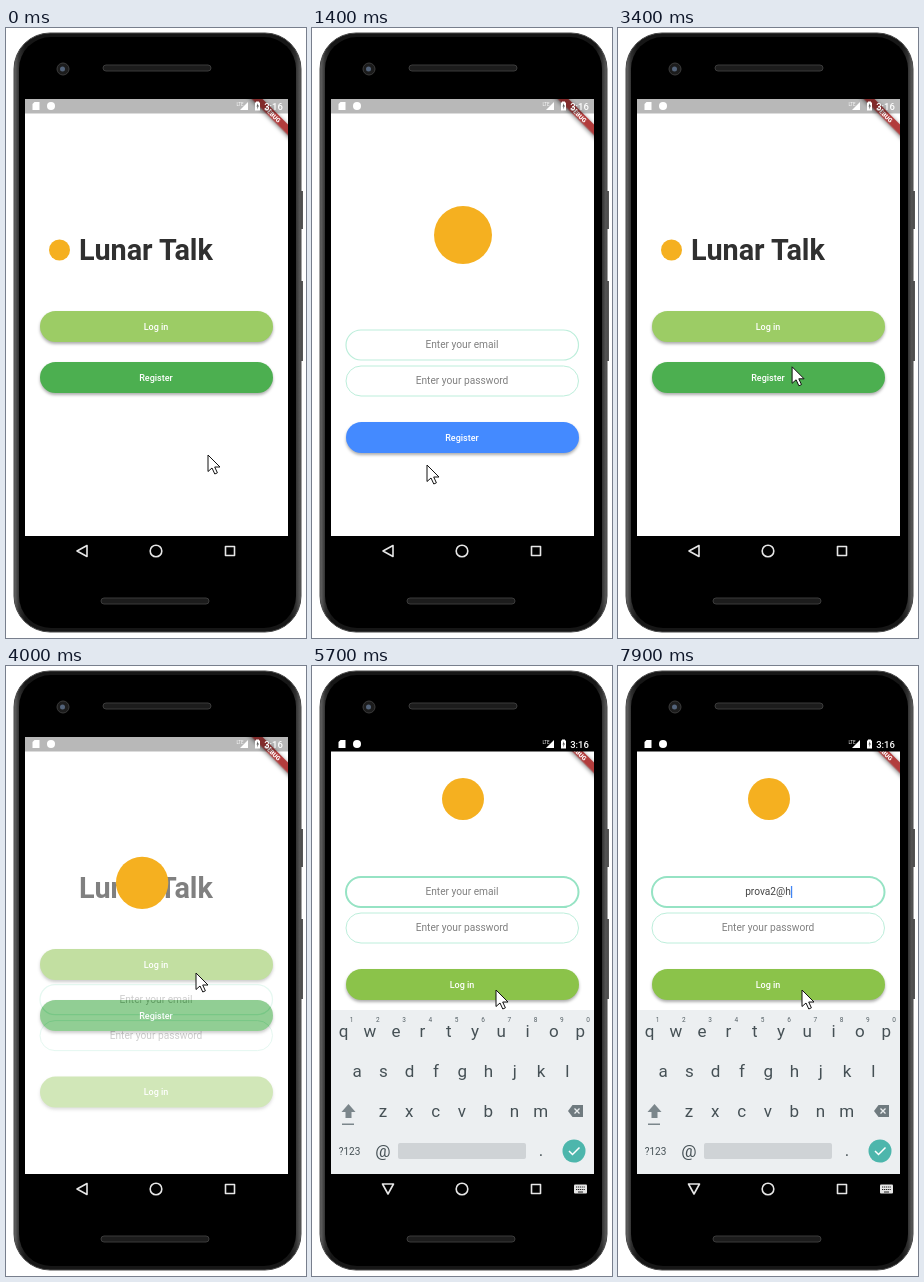
An HTML page for the animation above (8000 ms loop, 300 by 610 pixels).

```html
<!DOCTYPE html>
<html lang="en">
<head>
<meta charset="utf-8">
<style>
html, body { margin: 0; width: 100%; height: 100%; overflow: hidden; background: #fff; }
svg { display: block; }
text { font-family: Roboto, "Open Sans", sans-serif; text-anchor: middle; }
.label { font-size: 9px; font-weight: 500; fill: #fff; }
.hint { font-size: 10.2px; fill: #808080; }
.pill { filter: drop-shadow(0 2px 1.5px rgba(0, 0, 0, .32)); }
.key { font-size: 17px; fill: #455055; }
.digit { font-size: 6.5px; fill: #556066; }
</style>
</head>
<body>
<svg width="300" height="610" viewBox="0 0 300 610">
  <defs>
    <clipPath id="screen"><path d="M19 71H282V508H19Z"/></clipPath>
    <linearGradient id="rim">
      <stop offset="0" stop-color="#6a6a6a"/><stop offset=".018" stop-color="#303030"/>
      <stop offset=".04" stop-color="#161616"/><stop offset=".96" stop-color="#161616"/>
      <stop offset=".982" stop-color="#303030"/><stop offset="1" stop-color="#606060"/>
    </linearGradient>
  </defs>

  <path d="M294 163h3v38h-3zM294 253h3v80h-3z" fill="#555"/>
  <rect x="8" y="5" width="287" height="599" rx="36" fill="url(#rim)" stroke="#484848"/>
  <rect x="13" y="9" width="277" height="591" rx="32"/>
  <g fill="#1c1c1c" stroke="#3b3b3b">
    <rect x="97" y="37" width="108" height="6" rx="3"/>
    <rect x="95" y="570" width="108" height="6" rx="3"/>
    <circle cx="57" cy="41" r="6"/>
  </g>
  <circle cx="56.5" cy="41" r="2.5" fill="#53637a"/>

  <g clip-path="url(#screen)">
    <path d="M19 71H282V508H19Z" fill="#fff"/>
    <g id="welcome"></g>
    <g id="page"></g>
    <circle id="logo" fill="#f5b020"/>
    <g id="keyboard"></g>
    <g transform="translate(282 71) rotate(45)">
      <path d="M-40 18H40V25.6H-40Z" fill="#b23c3c" style="filter:drop-shadow(0 1px 2px #0008)"/>
      <text y="24.2" font-size="6.2" font-weight="900" fill="#fff">DEBUG</text>
    </g>
    <path id="status" d="M19 71H282V85.500H19Z"/>
    <g fill="#fff">
      <path d="M28.500 74H33.500V82H26.500V76Z"/>
      <circle cx="45" cy="78" r="4"/>
      <path d="M242 74V82H234ZM249 74.500h1v-1h3v1h1V82.500h-5z"/>
      <text x="234" y="77.500" font-size="4.500">LTE</text>
      <text x="267.500" y="82" font-size="9.500" font-weight="500">3:16</text>
    </g>
    <path d="M252 75l-1.500 3.500h1l-.5 3 2-4h-1z" fill="#555"/>
  </g>

  <rect id="ripple" x="41" y="508" width="69" height="31" rx="15" fill="#262626"/>
  <g fill="none" stroke="#e6e6e6" stroke-width="1.600" stroke-linejoin="round">
    <path id="back" d="M71 523L81 517.500V528.500Z"/>
    <circle cx="150" cy="523" r="5.800"/>
    <path d="M219.500 518.500h9v9h-9z"/>
  </g>
  <g id="imeIcon">
    <rect x="262" y="518.500" width="13" height="9" rx="1" fill="#e6e6e6"/>
    <path d="M264 521h9M264 523.500h9" stroke="#222" stroke-dasharray="1.200 .7"/>
    <path d="M266 526h5" stroke="#222"/>
  </g>
  <path id="mouse" d="M0 0V16.500L4 13L6.800 19L9.400 17.800L6.700 12H12Z" fill="#fff" stroke="#111"/>
</svg>
<script>
const LOOP = 8000, SLIDE = 300;
const REGISTER = 780, BACK = 2515, LOGIN = 3831, FOCUS = 5000, RESIZE = 5300;
const $ = id => document.getElementById(id);
const set = (id, attrs) => { for (const k in attrs) $(id).setAttribute(k, attrs[k]); };
const show = (id, on) => set(id, { visibility: on ? 'visible' : 'hidden' });
const clamp = v => Math.max(0, Math.min(1, v));
const mix = (a, b, p) => a + (b - a) * p;

function bezier(x1, y1, x2, y2) {
  const at = (a, b, s) => 3 * (1 - s) ** 2 * s * a + 3 * (1 - s) * s * s * b + s ** 3;
  return t => {
    if (t <= 0 || t >= 1) return clamp(t);
    let lo = 0, hi = 1;
    for (let i = 0; i < 24; i++) {
      const mid = (lo + hi) / 2;
      if (at(x1, x2, mid) < t) lo = mid; else hi = mid;
    }
    return at(y1, y2, lo);
  };
}
const emphasized = bezier(.4, 0, .2, 1), easeIn = bezier(.42, 0, 1, 1);
const smooth = bezier(.42, 0, .58, 1);

const text = (x, y, s, cls, extra = '') => `<text x="${x}" y="${y}" class="${cls}" ${extra}>${s}</text>`;
const pill = (y, color, label, id) =>
  `<rect x="34" y="${y}" width="233" height="31" rx="15.5" fill="${color}" class="pill" id="${id}Fill"/>` +
  text(150, y + 18.7, label, 'label', `id="${id}"`);
const field = (y, hint, id) =>
  `<rect x="34" y="${y}" width="232.500" height="30" rx="15" fill="#fff" stroke="#bdeedb" id="${id}Box"/>` +
  text(150, y + 18.3, hint, 'hint', `id="${id}"`);

$('welcome').innerHTML =
  '<text x="73" y="232" font-size="28.800" font-weight="700" fill="#303030" style="text-anchor:start">Lunar Talk</text>' +
  pill(283, '#9ccc65', 'Log in', 'goLogin') + pill(334, '#4caf50', 'Register', 'goRegister');

$('page').innerHTML = '<path d="M19 71H282V620H19Z" fill="#fff"/>' +
  field(302, 'Enter your email', 'email') + field(338, 'Enter your password', 'password') +
  pill(394, '#448aff', 'Register', 'submit') +
  '<path id="caret" d="M0 311V323" stroke="#4285f4" stroke-width="1.300"/>';

const row = (keys, x, y) => [...keys].map((k, i) => text(x + i * 26.3, y, k, 'key')).join('');
$('keyboard').innerHTML = '<path d="M19 344H282V508H19Z" fill="#eceff1"/>' +
  row('qwertyuiop', 31.5, 371) + row('asdfghjkl', 45, 411) + row('zxcvbnm', 71, 451) +
  [...'1234567890'].map((d, i) => text(39.5 + i * 26.3, 355.5, d, 'digit')).join('') +
  '<path d="M36.500 438L43.500 446H39.500V452H33.500V446H29.500ZM30 457.500H42V459H30Z" fill="#7b868b"/>' +
  '<path d="M256 445L260.500 439H271V451H260.500Z" fill="#6f7a7f"/>' +
  '<path d="M262.500 442.500l5 5m0-5l-5 5" stroke="#eceff1" stroke-width="1.300"/>' +
  text(37.5, 488.5, '?123', 'key', 'style="font-size:10px"') + text(71, 490.5, '@', 'key') +
  '<rect x="86" y="477" width="128" height="16" rx="2" fill="#cfd3d6"/>' + text(229, 490, '.', 'key') +
  '<circle cx="262" cy="485" r="11.500" fill="#4db6ac"/>' +
  '<path d="M257 485l3.500 3.500 7-7" fill="none" stroke="#fff" stroke-width="1.500"/>';

// Pointer stops: time, x, y
const stops = [[0, 202, 427], [150, 202, 427], [650, 172, 352], [850, 172, 352], [1350, 115, 437],
  [1600, 115, 437], [2250, 81, 525], [2850, 81, 525], [3600, 190, 307], [4150, 190, 307],
  [4700, 184, 324], [LOOP, 184, 324]];
// Typed characters and the times they appear
const typed = 'prova2@h', strokes = [5900, 6100, 6300, 6500, 6700, 7200, 7600, 7850];

function pointer(t) {
  const i = stops.findIndex(s => s[0] > t);
  const a = stops[i - 1], b = stops[i], p = smooth((t - a[0]) / (b[0] - a[0]));
  return `translate(${mix(a[1], b[1], p)} ${mix(a[2], b[2], p)})`;
}

function draw(t) {
  const popping = t >= BACK && t < LOGIN, login = t >= LOGIN;
  const k = popping ? 1 - clamp((t - BACK) / SLIDE) : clamp((t - (login ? LOGIN : REGISTER)) / SLIDE);
  const focused = t >= FOCUS, resized = t >= RESIZE;
  const slide = 109 * (1 - emphasized(k));
  const shift = resized ? -91 : focused ? 7 : 0;

  show('welcome', k < 1);
  set('page', { opacity: easeIn(k), transform: `translate(0 ${slide + shift})` });
  set('submitFill', { fill: login ? '#8bc34a' : '#448aff' });
  $('submit').textContent = login ? 'Log in' : 'Register';

  // The logo flies between screens along an arc
  let x, y, r;
  if (popping) {
    const q = emphasized(1 - k);
    x = mix(151, 53.5, q); y = mix(207, 222, q * q); r = mix(29, 10.5, q * q);
  } else {
    const p = emphasized(k);
    x = mix(53.5, 151, p); r = mix(10.5, 29, p);
    y = mix(222, 207, p * p) + (k > 0 ? .4 * slide * p : 0);
  }
  if (resized) { y = 133; r = 21; } else y += shift;
  set('logo', { cx: x, cy: y, r });

  const count = strokes.filter(s => t >= s).length;
  const email = $('email');
  email.textContent = count ? typed.slice(0, count) : 'Enter your email';
  email.style.fill = count ? '#444' : '';
  set('emailBox', { stroke: resized ? '#96e3c4' : '#bdeedb', 'stroke-width': resized ? 2 : 1.2 });
  const last = count ? strokes[count - 1] : FOCUS;
  show('caret', focused && (t - last) % 1000 < 500);
  const caretX = count ? 150.7 + email.getComputedTextLength() / 2 : 150;
  set('caret', { transform: `translate(${caretX} 0)` });

  set('keyboard', { transform: `translate(0 ${164 * (1 - emphasized((t - 5180) / 220))})` });
  set('status', { opacity: focused ? 1 : .28 });
  show('imeIcon', focused);
  set('back', { transform: focused ? 'rotate(-90 76 523)' : '' });
  set('ripple', { opacity: clamp((t - 2400) / 120) * clamp((2950 - t) / 200) });
  set('mouse', { transform: pointer(t) });
}

function tick() {
  draw(performance.now() % LOOP);
  requestAnimationFrame(tick);
}
tick();
</script>
</body>
</html>
```
